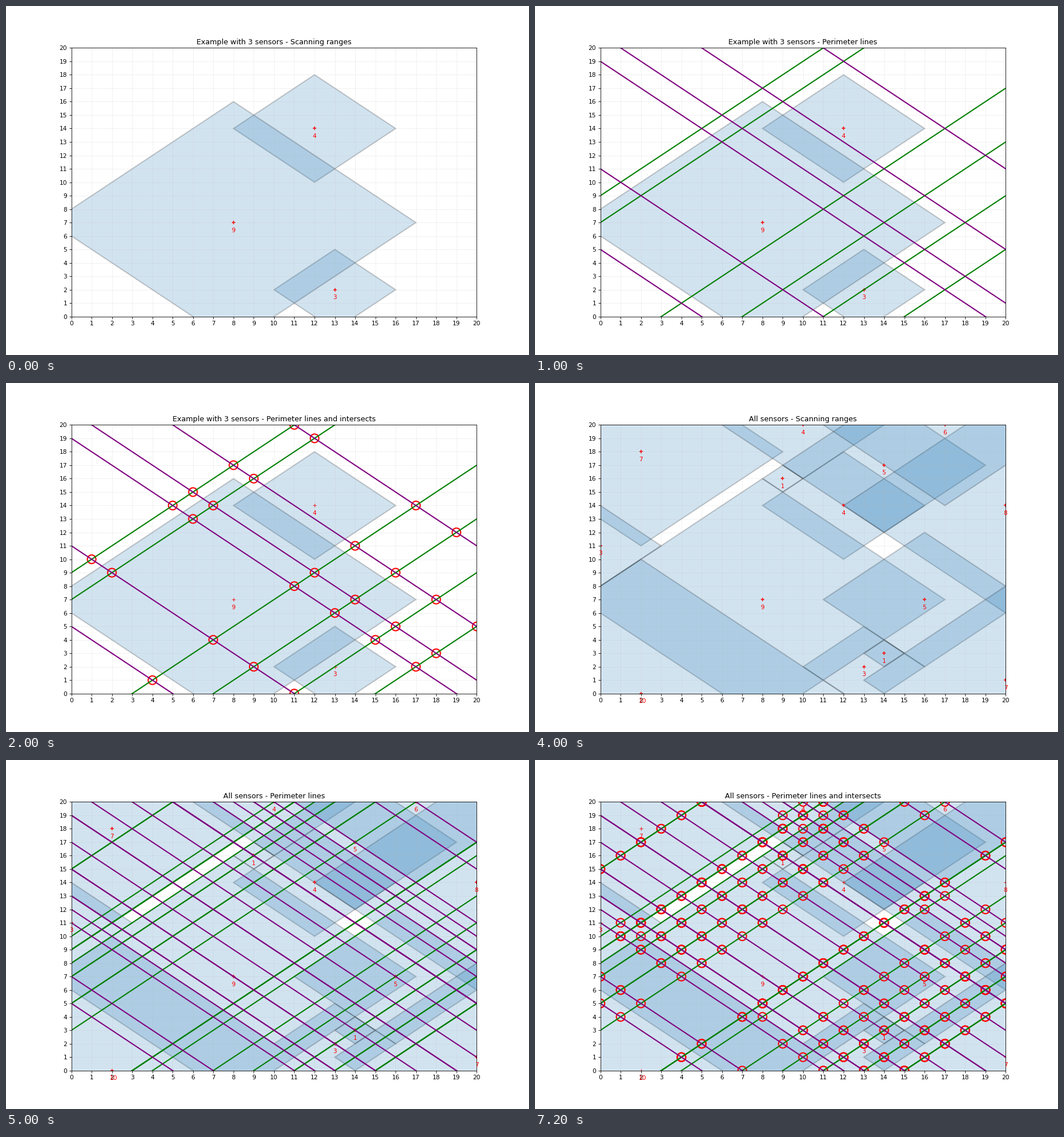
These frames come from a looping animation (917x611 px, 8000 ms). A matplotlib script:

```python
from itertools import product

import matplotlib.pyplot as plt
import numpy as np
from matplotlib.animation import FuncAnimation

plt.rcParams["font.family"] = "DejaVu Sans"

DPI = 917 / 12
SIZE = 20

# x, y, scanning range
SENSORS = [
    (2, 18, 7), (9, 16, 1), (13, 2, 3), (12, 14, 4), (10, 20, 4),
    (14, 17, 5), (8, 7, 9), (2, 0, 10), (0, 11, 3), (20, 14, 8),
    (17, 20, 6), (16, 7, 5), (14, 3, 1), (20, 1, 7),
]
EXAMPLE = [s for s in SENSORS if s[:2] in ((8, 7), (12, 14), (13, 2))]

GROUPS = [("Example with 3 sensors", EXAMPLE), ("All sensors", SENSORS)]
STAGES = ["Scanning ranges", "Perimeter lines",
          "Perimeter lines and intersects"]
STAGE_AT = [0, 1, 2, 2]  # stage shown in each second of a group

fig, ax = plt.subplots(figsize=(12, 611 / DPI), dpi=DPI)


def draw_ranges(sensors, cross_width):
    for x, y, r in sensors:
        ax.fill([x - r, x, x + r, x], [y, y + r, y, y - r],
                facecolor="tab:blue", edgecolor="black",
                linewidth=2, alpha=0.2)
    xs, ys, _ = zip(*sensors)
    ax.scatter(xs, ys, s=36, marker="+", color="red", linewidths=cross_width)
    for x, y, r in sensors:
        ax.text(x - 0.1, y - 0.7, str(r), color="red")


def perimeters(sensors):
    """Intercepts of the rising and falling lines just outside each range."""
    rising = [y - x + k * (r + 1) for x, y, r in sensors for k in (1, -1)]
    falling = [y + x + k * (r + 1) for x, y, r in sensors for k in (1, -1)]
    return rising, falling


def draw_lines(rising, falling):
    xs = np.array([-5, SIZE + 5])
    for c in rising:
        ax.plot(xs, xs + c, color="green", linewidth=2)
    for c in falling:
        ax.plot(xs, c - xs, color="purple", linewidth=2)


def draw_intersects(rising, falling):
    points = [((b - a) // 2, (a + b) // 2)
              for a, b in product(rising, falling) if (a + b) % 2 == 0]
    points = [p for p in points if 0 <= min(p) and max(p) <= SIZE]
    ax.scatter(*zip(*points), s=200, facecolors="none",
               edgecolors="red", linewidths=2)


def draw(i):
    group, second = divmod(i, len(STAGE_AT))
    name, sensors = GROUPS[group]
    stage = STAGE_AT[second]

    ax.clear()
    ax.set(xlim=(0, SIZE), ylim=(0, SIZE),
           xticks=range(SIZE + 1), yticks=range(SIZE + 1))
    ax.grid(alpha=0.2)
    ax.set_title(f"{name} - {STAGES[stage]}")

    draw_ranges(sensors, 1 if stage == 2 else 1.5)
    lines = perimeters(sensors)
    if stage > 0:
        draw_lines(*lines)
    if stage > 1:
        draw_intersects(*lines)
    return []


anim = FuncAnimation(fig, draw, frames=8, interval=1000,
                     init_func=lambda: draw(0), repeat=True)
plt.show()
```
